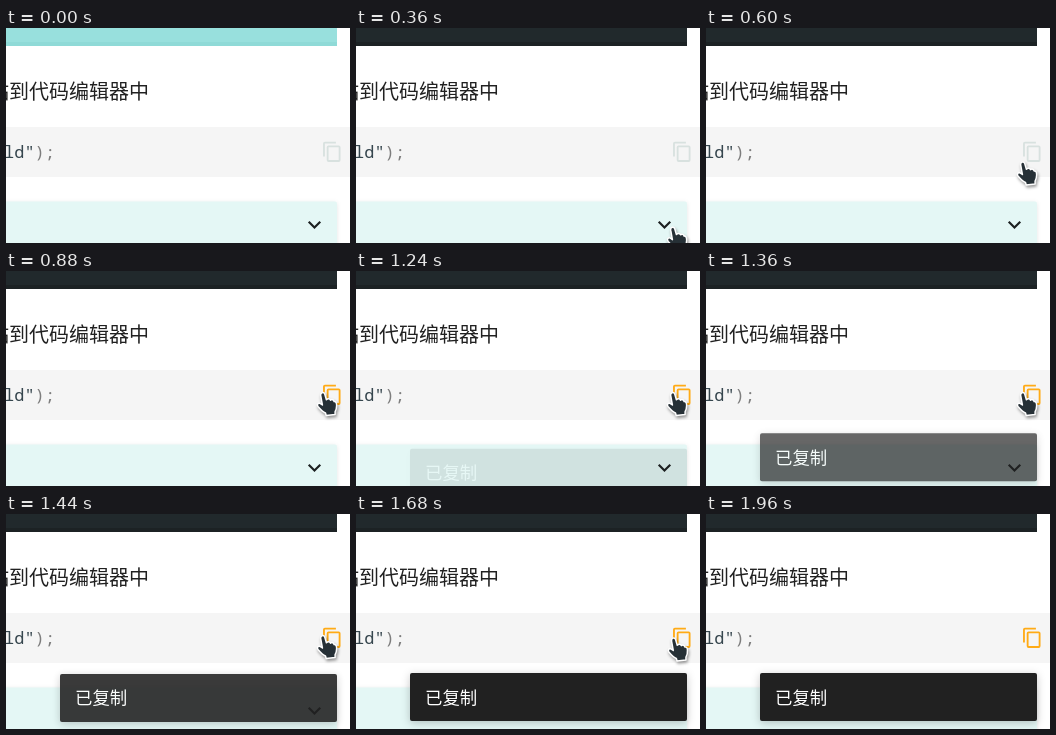
An HTML page that plays this animation: 344 by 215 pixels, repeating every 2 s.

```html
<!DOCTYPE html>
<html lang="zh-CN">
<head>
<meta charset="utf-8">
<title>复制代码</title>
<style>
html, body { margin: 0; width: 100%; height: 100%; overflow: hidden; background: #fff; }
svg { display: block; width: 100%; height: 100%; }
.cjk { font-family: "Noto Sans CJK SC", "Noto Sans CJK", sans-serif; }
.code { font: 17px "Noto Sans Mono", "DejaVu Sans Mono", monospace; white-space: pre; }
.panel { filter: drop-shadow(0 1px 2px rgba(0, 0, 0, .1)); }
.toast { filter: drop-shadow(0 2px 4px rgba(0, 0, 0, .22)); }
.hand { filter: drop-shadow(1px 2px 1.5px rgba(0, 0, 0, .4)); }
</style>
</head>
<body>
<svg viewBox="0 0 344 215">
  <rect width="344" height="215" fill="#fff"/>
  <rect id="bar" width="331" height="18"/>
  <rect id="barEdge" y="14" width="331" height="4"/>

  <text class="cjk" x="-17" y="71" font-size="20" font-weight="300" fill="#212121">贴到代码编辑器中</text>

  <rect y="99" width="344" height="50" fill="#f5f5f5"/>
  <text class="code" x="-2" y="130" fill="#36464e">ld"<tspan fill="#7d7d7d">);</tspan></text>
  <path id="copy" transform="translate(315.2 112.8) scale(.92)"
    d="M19 21H8V7h11m0-2H8a2 2 0 0 0-2 2v14a2 2 0 0 0 2 2h11a2 2 0 0 0 2-2V7a2 2 0 0 0-2-2m-3-4H4a2 2 0 0 0-2 2v14h2V3h12V1Z"/>

  <rect class="panel" x="-4" y="173.5" width="335" height="60" rx="2" fill="#e4f7f5"/>
  <path transform="translate(295.4 183.6) scale(1.09)" fill="#1c2021"
    d="M7.41 8.58 12 13.17l4.59-4.59L18 10l-6 6-6-6Z"/>

  <g id="toast" class="toast">
    <rect x="54" y="159" width="277" height="48" rx="2" fill="#212121"/>
    <text class="cjk" x="69" y="189.5" font-size="17.4" fill="#fff">已复制</text>
  </g>

  <g id="hand" class="hand">
    <path fill="#263036" stroke="#fff" stroke-width="1.5" stroke-linejoin="round"
      d="M4.7 4.6C4.2 1.2 8 .6 8.8 3.4L10.4 8.8C12 7.2 13.9 7.7 14.5 9.2C16 8 17.7 8.8 18.1 10.5C19.7 10.2 20.5 11.7 20.6 13.5C20.8 16.5 20.4 18.5 19.1 20.6V23.6L10.2 24.6L9.5 22C7 21 4.4 18.4 2.2 15.8C.4 13.2 2.6 11.4 4.4 12.6L6.4 14Z"/>
  </g>
</svg>
<script>
const LOOP = 2000, STEP = 40;
const el = id => document.getElementById(id);
const clamp = v => Math.min(1, Math.max(0, v));
const span = (t, from, to) => clamp((t - from) / (to - from));
const mix = (a, b, p) => `rgb(${a.map((v, i) => Math.round(v + (b[i] - v) * p))})`;
const easeInOut = p => (1 - Math.cos(Math.PI * p)) / 2;

function bezier(x1, y1, x2, y2) {
  const at = (a, b, s) => 3 * a * s * (1 - s) ** 2 + 3 * b * s * s * (1 - s) + s ** 3;
  return x => {
    let lo = 0, hi = 1;
    for (let i = 0; i < 24; i++) {
      const mid = (lo + hi) / 2;
      if (at(x1, x2, mid) < x) lo = mid; else hi = mid;
    }
    return at(y1, y2, (lo + hi) / 2);
  };
}
const ease = bezier(.25, .1, .25, 1);
const slide = bezier(.075, .85, .175, 1);

function draw(t) {
  const dark = span(t, 160, 320);
  el("bar").setAttribute("fill", mix([152, 224, 221], [33, 41, 44], dark));
  el("barEdge").setAttribute("fill", mix([143, 218, 215], [28, 34, 36], dark));

  const hover = ease(span(t, 720, 880));
  el("copy").setAttribute("fill", mix([216, 225, 223], [255, 171, 22], hover));

  const shown = span(t, 1200, 1600);
  el("toast").setAttribute("opacity", ease(shown));
  el("toast").setAttribute("transform", `translate(0 ${48 * (1 - slide(shown))})`);

  // The pointer rises to the icon, rests, then leaves at the lower right.
  const enter = 1 - easeInOut(span(t, 200, 720));
  const leave = span(t, 1640, 1900) ** 2;
  const x = 310 + 36 * leave;
  const y = 120 + 99 * enter + 104 * leave;
  el("hand").setAttribute("transform", `translate(${x} ${y})`);
}

const start = performance.now();
function tick() {
  const t = (performance.now() - start) % LOOP;
  draw(Math.floor(t / STEP) * STEP);
  requestAnimationFrame(tick);
}
tick();
</script>
</body>
</html>
```
